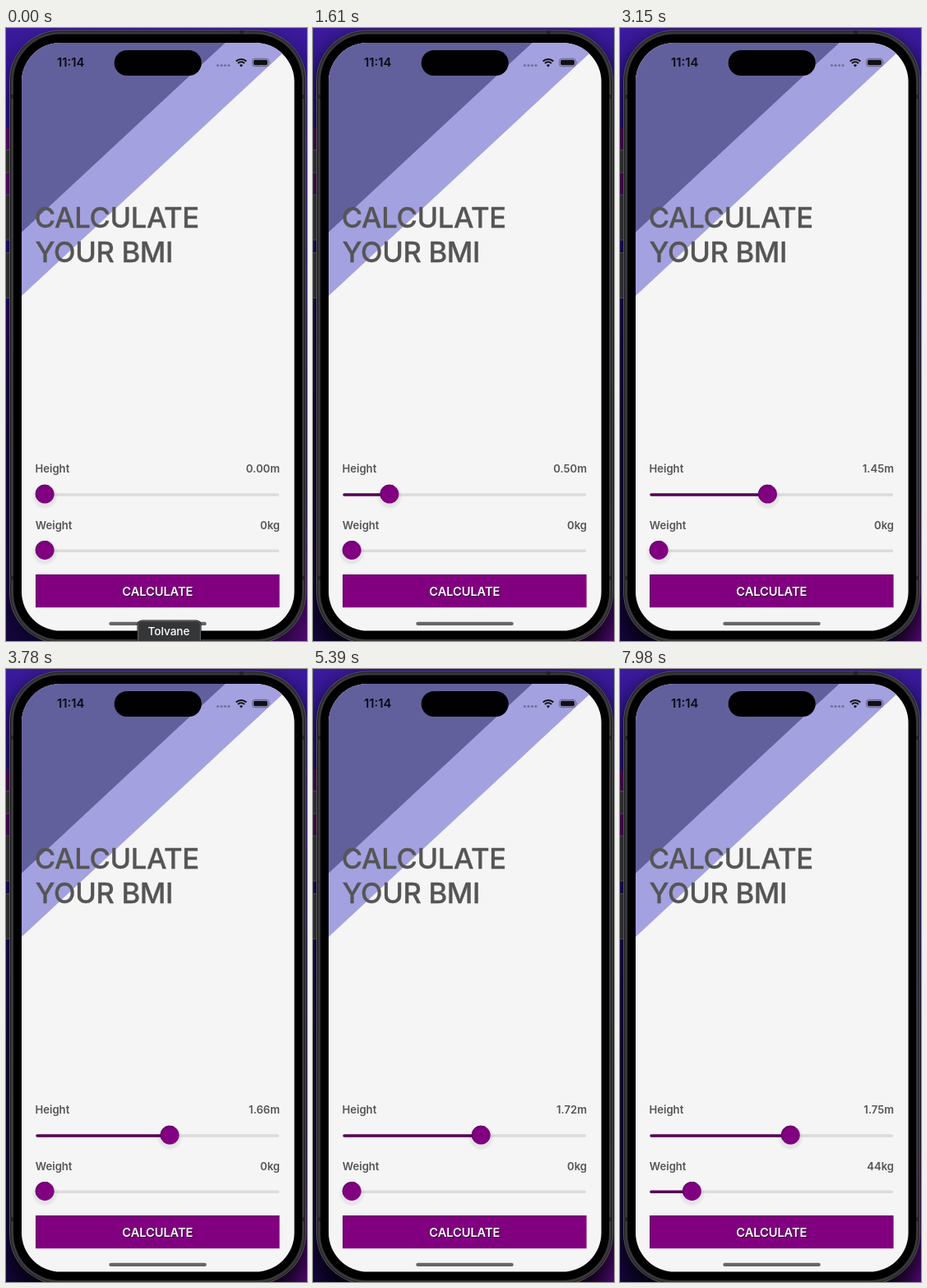
An HTML page for the animation above (8000 ms loop, 366x746 px).

```html
<!DOCTYPE html>
<html lang="en">
<head>
<meta charset="utf-8">
<title>BMI calculator</title>
<style>
  html, body { margin: 0; width: 100%; height: 100%; overflow: hidden; background: #12052e; }
  svg { display: block; width: 366px; height: 746px; }
  text { font-family: Inter, "Liberation Sans", sans-serif; font-optical-sizing: none; font-weight: 600; }
  .title { font-size: 34.6px; font-weight: 500; letter-spacing: -.35px; fill: #555; stroke: #555; stroke-width: .3; }
  .label { font-size: 13.1px; fill: #555; }
  .value { text-anchor: end; }
  .clock { font-size: 14.8px; fill: #0a0a12; }
  .action { font-size: 14.7px; letter-spacing: -.12px; fill: #fff; text-anchor: middle; filter: drop-shadow(1px 1px .6px #0009); }
  .tip text { font-size: 13.5px; font-weight: 500; fill: #fff; text-anchor: middle; }
  .track, .fill { stroke-width: 3.4; stroke-linecap: round; }
  .track { stroke: #dcdcdc; }
  .fill { stroke: #580058; }
</style>
</head>
<body>
<svg viewBox="0 0 366 746">
  <defs>
    <linearGradient id="wall" x2="0" y2="1">
      <stop offset="0" stop-color="#3c1b9e"/>
      <stop offset=".12" stop-color="#2a128a"/>
      <stop offset=".4" stop-color="#1f0c62"/>
      <stop offset=".65" stop-color="#15063a"/>
      <stop offset="1" stop-color="#150640"/>
    </linearGradient>
    <radialGradient id="glow" cx="1" cy="1" r=".25">
      <stop offset="0" stop-color="#560a78"/>
      <stop offset="1" stop-color="#560a78" stop-opacity="0"/>
    </radialGradient>
    <clipPath id="screen"><rect x="19" y="18" width="331.600" height="715.600" rx="47.500"/></clipPath>
    <filter id="soft" x="-50%" y="-50%" width="200%" height="200%"><feGaussianBlur stdDeviation="1.2"/></filter>
    <filter id="wide" x="-20%" y="-20%" width="140%" height="140%"><feGaussianBlur stdDeviation="12"/></filter>
    <g id="thumb">
      <circle cy="3" r="14.300" fill="#000" opacity=".06" filter="url(#soft)"/>
      <circle r="11.400" fill="#800080"/>
      <path d="M-9.500 5A10.700 10.700 0 0 1 5-9.500" fill="none" stroke="#62006a" stroke-width="1.400"/>
    </g>
  </defs>

  <rect width="366" height="746" fill="url(#wall)"/>
  <rect width="366" height="746" fill="url(#glow)"/>
  <path d="M0 122h5v80H0z" fill="#560a66"/>
  <rect id="shadow" x="4" y="10" width="361" height="760" rx="62" filter="url(#wide)"/>
  <g fill="#2b2b2d" stroke="#555" stroke-width=".8">
    <path d="M-1 148.500h6v27.500h-6zM-1 203h6v55h-6zM-1 273.500h6v55h-6z"/>
  </g>

  <rect x="4" y="2.500" width="361" height="746.500" rx="62" fill="#565658"/>
  <rect x="5" y="3.500" width="359" height="744.500" rx="61" fill="#1b1b1d"/>
  <rect x="6" y="4.500" width="357" height="742.500" rx="60" fill="#38383a"/>
  <path d="M284 3h5v4h-5zM5 81h4v5h-4zM360 81h4v5h-4zM5 667h4v5h-4zM360 667h4v5h-4z" fill="#242426"/>
  <rect x="9" y="7.500" width="351" height="736.500" rx="57"/>

  <g clip-path="url(#screen)">
    <rect x="19" y="18" width="332" height="716" fill="#f5f5f5"/>
    <path d="M19 18H350L19 326z" fill="#a4a1e0"/>
    <path d="M19 18H266.600L19 248.600z" fill="#62609c"/>
  </g>
  <rect x="131.700" y="27" width="106" height="31" rx="15.500"/>

  <text class="clock" x="62" y="47.300">11:14</text>
  <g opacity=".3">
    <circle cx="257.500" cy="45.500" r="1.600"/><circle cx="262" cy="45.500" r="1.600"/>
    <circle cx="266.500" cy="45.500" r="1.600"/><circle cx="271" cy="45.500" r="1.600"/>
  </g>
  <g fill="none" stroke="#111" stroke-width="2">
    <path d="M279.700 40.500a9 9 0 0 1 12.600 0M282 43a5.700 5.700 0 0 1 8 0"/>
  </g>
  <path d="M283.900 45.200a3 3 0 0 1 4.200 0L286 47.400z" fill="#111"/>
  <rect x="299.500" y="37.300" width="20" height="9.400" rx="3" fill="none" stroke="#000" stroke-opacity=".4"/>
  <rect x="301" y="38.800" width="17" height="6.400" rx="1.700" fill="#111"/>
  <path d="M320.700 40.500q1.500 1.500 0 3z" fill-opacity=".4"/>

  <text class="title" x="34.800" y="242.800">CALCULATE</text>
  <text class="title" x="35.600" y="284.800">YOUR BMI</text>

  <g id="height">
    <text class="label" x="35.500" y="541.300">Height</text>
    <text class="label value" x="333" y="541.300"></text>
    <path class="track" d="M38 568H330.500"/>
    <path class="fill"/>
    <use href="#thumb"/>
  </g>
  <g id="weight" transform="translate(0 68.300)">
    <text class="label" x="35.800" y="541.300">Weight</text>
    <text class="label value" x="333" y="541.300"></text>
    <path class="track" d="M38 568H330.500"/>
    <path class="fill"/>
    <use href="#thumb"/>
  </g>

  <rect x="36" y="665" width="296.600" height="40.200" fill="#800080"/>
  <path d="M36.700 705V665.700H332" fill="none" stroke="#6a006c" stroke-width="1.400"/>
  <text class="action" x="184.300" y="690.700">CALCULATE</text>
  <rect x="125.300" y="722.800" width="118.500" height="4.300" rx="2.150" fill="#666"/>

  <g id="tip" class="tip">
    <rect x="159.500" y="720.500" width="78" height="34" rx="6" fill="#111"/>
    <rect x="160.700" y="721.700" width="75.600" height="32" rx="5" fill="#353637" stroke="#6a6a6c"/>
    <text x="198" y="739.300">Tolvane</text>
  </g>
</svg>
<script>
const LOOP = 8000, TICK = 70;
const $ = id => document.getElementById(id);
const linear = p => p;
const smooth = p => p * p * (3 - 2 * p);

// Each move: start in ms, number of ticks, end value, easing
const heightMoves = [
  [1400, 9, 1.2, smooth], [2170, 2, 1.18], [2520, 4, 1.44, smooth],
  [3150, 10, 1.66, smooth], [4130, 2, 1.67], [4340, 1, 1.69], [4480, 1, 1.7],
  [4690, 1, 1.712], [5390, 6, 1.742], [6230, 5, 1.75]
];
const weightMoves = [[7840, 3, 44]];
const tipMoves = [[140, 5, 0]];

function valueAt(t, moves, value = 0) {
  for (const [start, ticks, end, ease = linear] of moves) {
    if (t < start) break;
    const p = Math.min(1, (Math.floor((t - start) / TICK) + 1) / ticks);
    value += (end - value) * ease(p);
  }
  return value;
}

function setSlider(id, ratio, label) {
  const row = $(id), x = 47.2 + 274.5 * ratio;
  row.querySelector('.value').textContent = label;
  row.querySelector('.fill').setAttribute('d', `M38 568H${x}`);
  row.querySelector('use').setAttribute('transform', `translate(${x} 567.2)`);
}

const origin = performance.now();

function draw() {
  const t = (performance.now() - origin) % LOOP;
  const height = valueAt(t, heightMoves), weight = valueAt(t, weightMoves);
  const shown = valueAt(t, tipMoves, 1);
  setSlider('height', height / 3, height.toFixed(2) + 'm');
  setSlider('weight', weight / 300, Math.round(weight) + 'kg');
  $('tip').style.opacity = shown;
  // The phone window gains a deeper shadow as the tooltip leaves
  $('shadow').style.opacity = .75 - .4 * shown;
  requestAnimationFrame(draw);
}
draw();
</script>
</body>
</html>
```
